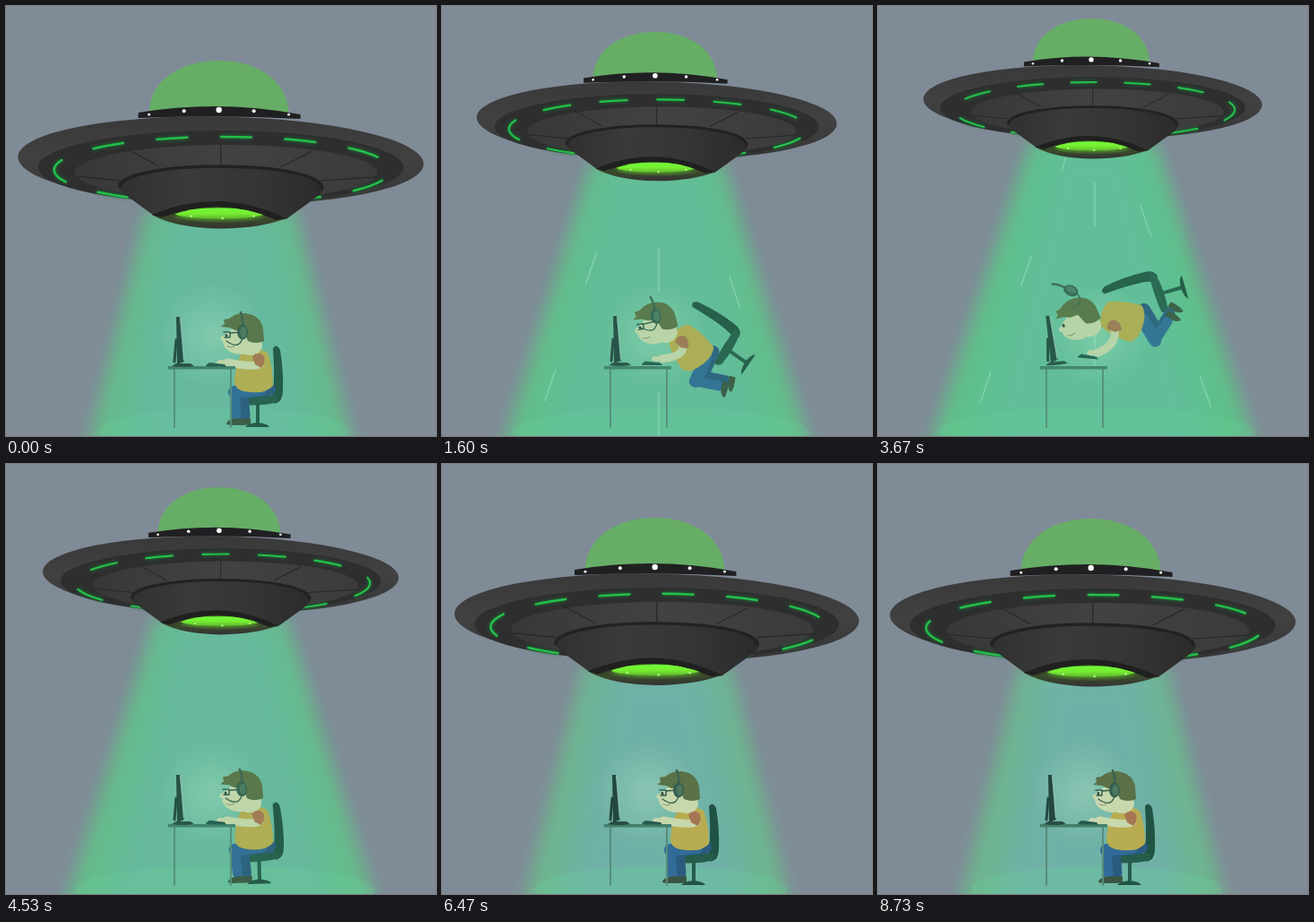
An HTML page with a canvas for the animation above (8790 ms loop, 480x480 px).

```html
<!DOCTYPE html>
<html lang="en">
<head>
<meta charset="utf-8">
<title>Abduction</title>
<style>
  html, body { margin: 0; height: 100%; overflow: hidden; background: #808b98; }
  canvas { display: block; width: 100vw; height: 100vh; }
</style>
</head>
<body>
<canvas id="stage"></canvas>
<script>
const LOOP = 8790, SIZE = 480, ARRIVE = 2450, LEAVE = 3670;
const canvas = document.getElementById('stage');
const ctx = canvas.getContext('2d');
const ratio = window.devicePixelRatio || 1;
canvas.width = canvas.height = SIZE * ratio;

const mix = (a, b, u) => a + (b - a) * u;
const progress = (t, from, to) => Math.max(0, Math.min(1, (t - from) / (to - from)));
const smooth = u => u * u * (3 - 2 * u);
const ramp = (t, from, to) => smooth(progress(t, from, to));

// lift: ship height, green: beam colour, float: weightlessness, drift: slow hover.
function stateAt(t) {
  const down = progress(t, LEAVE, LEAVE + 2900);
  const rising = t < LEAVE;
  const lift = rising ? progress(t, 0, ARRIVE) ** .9 : 1 - (down + smooth(down)) / 2;
  const fall = ramp(t, LEAVE, 4600);
  return {
    lift,
    green: rising ? .45 + .4 * lift : .85 * lift * lift,
    float: ramp(t, 700, ARRIVE) - fall,
    drift: ramp(t, ARRIVE, LEAVE) * (1 - fall)
  };
}

function fill(style, d) {
  ctx.fillStyle = style;
  ctx.fill(new Path2D(d));
}
function stroke(style, width, d) {
  ctx.strokeStyle = style;
  ctx.lineWidth = width;
  ctx.stroke(new Path2D(d));
}
function oval(style, x, y, rx, ry = rx, tilt = 0) {
  ctx.fillStyle = style;
  ctx.beginPath();
  ctx.ellipse(x, y, rx, ry, tilt, 0, 7);
  ctx.fill();
}
function at(x, y, deg, draw) {
  ctx.save();
  ctx.translate(x, y);
  ctx.rotate(deg * Math.PI / 180);
  draw();
  ctx.restore();
}
function turn(x, y, deg) {
  const a = deg * Math.PI / 180, c = Math.cos(a), s = Math.sin(a);
  return [x * c - y * s, x * s + y * c];
}
const blend = (a, b, u) => `rgb(${a.map((v, i) => Math.round(mix(v, b[i], u)))})`;
function gradient(x0, y0, x1, y1, ...colors) {
  const g = ctx.createLinearGradient(x0, y0, x1, y1);
  colors.forEach((c, i) => g.addColorStop(i / (colors.length - 1), c));
  return g;
}

function beam(ship, style, inset, blur) {
  const { x, scale } = ship, top = ship.y + 55 * scale, low = 530;
  const half = 84 * scale, base = 150 + 34 * ship.lift;
  const wide = half + (base - half) * (low - top) / (SIZE - top);
  ctx.save();
  ctx.filter = `blur(${blur * ratio}px)`;
  fill(style, `M${x - half * inset} ${top}H${x + half * inset}L${x + wide * inset} ${low}H${x - wide * inset}Z`);
  ctx.restore();
}

function drawBeam(ship, green) {
  beam(ship, blend([110, 182, 142], [96, 194, 136], green), .97, 10);
  beam(ship, blend([113, 176, 168], [100, 193, 156], green), .72, 16);
  oval('rgba(105,215,155,.2)', 244, 475, 141 + 36 * ship.lift, 26);
}

// Three rays fan out from the ship; their streaks climb, faster on the left.
function drawStreaks(t, ship) {
  const alpha = .5 * progress(t, 900, 1400) * (1 - progress(t, 4000, 4350));
  if (!alpha) return;
  const top = ship.y + 70 * ship.scale;
  ctx.lineCap = 'round';
  for (const side of [-1, 0, 1]) {
    const outer = Math.abs(side), gap = 160 + 30 * side, half = 24 - 7 * outer;
    const climb = (.19 - .06 * side) * (t - 2470);
    const rayX = y => 242 + side * (43 + .35 * (y - 200));
    for (let y = (290 - 84 * outer - climb) % gap; y < 540; y += gap) {
      const y0 = Math.max(y - half, top), y1 = y + half;
      if (y1 > y0) stroke(`rgba(175,235,215,${alpha})`, 1.6, `M${rayX(y0)} ${y0}L${rayX(y1)} ${y1}`);
    }
  }
}

function drawDesk({ float, drift }) {
  stroke('#57887a', 2, 'M188 404V470M251 404V470');
  fill('#427b6a', 'M181 402H256V405.5H181Z');
  at(197 + 2 * float, 401 - 2 * float, -5 * drift, () => {
    fill('#24443f', 'M-12 1L-7 -2L9 -2L13 1Q0 3 -12 1Z');
    fill('#203f3c', 'M-7 -54L-3 -54L2 -4L-6 -1Z');
    fill('#8dbdb0', 'M-3 -54L-1 -52L2.5 -8L1 -4Z');
    stroke('#203f3c', 3, 'M-7 -28L-9 -4');
  });
  at(234, 400 - 3 * float - 6 * drift, 5 * drift, () =>
    fill('#21524a', 'M-11 1L-7 -2L10 0L12 2.5L-10 2.5Z'));
}

function drawChair({ float, drift }) {
  const x = 306 - 3 * float + 26 * Math.sin(Math.PI * float) + 2 * drift;
  at(x, 438 - 147 * float + 7 * drift, -106 * float, () => {
    fill('#1e4c40', 'M-8 -56Q-4 -62 0 -54Q4 -30 3 -8Q3 4 -6 6L-10 0Q-5 -12 -8 -56Z');
    fill('#235548', 'M-45 -1Q-25 -4 -2 -3L-2 4Q-20 9 -42 7Q-48 3 -45 -1Z');
    stroke('#235548', 4, 'M-25 6V29');
    fill('#1e4c40', 'M-39 32Q-37 28 -25 27Q-14 28 -12 32Z');
  });
}

// Each joint bends a little further than the one before it.
function drawLeg(float, x, color) {
  ctx.lineCap = ctx.lineJoin = 'round';
  at(8 + x, 20, -40 * float, () => {
    stroke(color, 14, 'M0 0L-29 3');
    at(-29, 3, -28 * float, () => {
      stroke(color, 11, 'M0 0L2 26');
      fill('#3a4d3d', 'M8 29L8 36Q-2 38 -9 36Q-9 32 -2 30Z');
    });
  });
}

function drawHead({ float, drift }, glasses) {
  const skin = '#d0d9b0';
  oval(skin, -3, 7, 20, 15);
  oval(skin, 8, 12, 13, 11);
  oval(skin, -22, 4, 3.5, 3);
  fill('#5c6c43', 'M-25 -9L-21 -12L-22 -17L-16 -18Q-8 -25 2 -24Q19 -22 22 -7L23 7Q14 11 5 7L0 -5L-9 -5L-15 -8Z');
  stroke('#8d9478', 1, 'M-18 13Q-14 15 -10 13');
  oval('#263d35', -19, 1, 1.4, 1.9);
  ctx.globalAlpha = glasses;
  stroke('#2d554b', 1.5, 'M-22 -3H-15V3H-21M-15 -2L-2 -3');
  ctx.globalAlpha = 1;
  at(-1 + 3 * float, -3 - 10 * float - 20 * drift, -45 * drift, () => {
    stroke('#3a5c4b', 2.5, 'M0 -4Q1 -15 -2 -22');
    stroke('#3a5c4b', 1.3, 'M0 7Q-4 20 -18 10');
    oval('#34594b', 0, 0, 6, 8.5);
    oval('#4c7360', 1, 0, 3.5, 6);
  });
}

function drawMan(state, glasses) {
  const { float, drift } = state;
  const x = 276 - 3 * drift, y = 408 - 50 * float - 7 * drift, lean = -75 * float;
  at(x, y, lean, () => {
    drawLeg(float, 10, '#28547f');
    drawLeg(float, 0, '#2f6599');
    fill('#bfab4d', 'M-12 -22Q4 -28 16 -21Q22 -6 22 16Q14 25 -4 23Q-20 22 -21 12Q-20 -10 -12 -22Z');
    at(-11, -41 - 6 * float, 55 * float, () => drawHead(state, glasses));
  });

  const [sx, sy] = turn(7 - 15 * float, -13 + 6 * float, lean);
  const shoulder = [x + sx, y + sy], hand = [240 - 2 * float, 398 - 8 * float - 3 * drift];
  const elbow = shoulder.map((v, i) => (v + hand[i]) / 2 + 15 - 8 * i);
  ctx.lineCap = 'round';
  stroke('#d0d9b0', 9, `M${shoulder[0]} ${shoulder[1] + 5}Q${elbow} ${hand[0] + 7} ${hand[1]}`);
  oval('#d0d9b0', ...hand, 5, 3);
  at(...shoulder, -50 * float, () => fill('#ac704f', 'M-8 -4Q-1 -11 5 -4Q7 3 2 9L-5 5Z'));
}

function drawGlow(float) {
  const x = 230 + 16 * float, y = 368;
  const glow = ctx.createRadialGradient(x, y, 5, x, y, 58);
  glow.addColorStop(0, 'rgba(175,225,200,.42)');
  glow.addColorStop(1, 'rgba(175,225,200,0)');
  oval(glow, x, y, 58);
}

// Eleven dashes make one full turn of the rim per loop.
function drawLights(t) {
  const rx = 188, ry = 37, h = ((rx - ry) / (rx + ry)) ** 2;
  const around = Math.PI * (rx + ry) * (1 + 3 * h / (10 + Math.sqrt(4 - 3 * h)));
  ctx.save();
  ctx.lineCap = 'round';
  ctx.strokeStyle = '#24c04b';
  ctx.lineWidth = 2.5;
  ctx.shadowColor = '#168a35';
  ctx.shadowBlur = 4 * ratio;
  ctx.setLineDash([34, around / 11 - 34]);
  ctx.lineDashOffset = 2 - around * t / LOOP;
  ctx.beginPath();
  ctx.ellipse(242, 183, rx, ry, 0, -Math.PI / 2, Math.PI * 1.5);
  ctx.stroke();
  ctx.restore();
}

function drawMouth() {
  fill(gradient(0, 228, 0, 248, '#2c3a20', '#3b4a2c', '#333433'),
    'M163 233Q238 201 313 237Q285 248 240 248.5Q190 248 163 233Z');
  fill('#1f201f', 'M163 233Q238 201 313 237L302 239Q238 211 174 236Z');
  ctx.save();
  ctx.clip(new Path2D('M180 235Q238 213 298 237Q270 242 240 242Q204 242 180 235Z'));
  ctx.shadowColor = '#63d92f';
  ctx.shadowBlur = 6 * ratio;
  oval(gradient(0, 225, 0, 238, '#70fa38', '#76ee32', '#5fb52c'), 239, 231.5, 50, 6);
  ctx.restore();
  for (const k of [-1, 0, 1]) oval('#b4ff83', 242 + 35 * k, 237 - 2.5 * Math.abs(k), 1.3);
}

function drawShip(ship, t) {
  ctx.save();
  ctx.translate(ship.x, ship.y);
  ctx.scale(ship.scale, ship.scale);
  ctx.translate(-240, -170);
  ctx.lineCap = 'butt';

  fill('#66ae66', 'M160 118C161 84 194 61 238 61C283 61 315 85 316 120Z');
  oval(gradient(0, 122, 0, 222, '#393939', '#414141', '#353535'), 240, 172.5, 226.5, 49, .018);
  fill('#202022', 'M148 119Q238 104 329 121V126Q238 121 148 125Z');
  for (let k = -2; k <= 2; k++)
    oval('#fff', 238 + 39 * k, 116 + 1.3 * k * k, 3.2 / (1 + .6 * Math.abs(k)));
  oval('#2e2e2f', 240, 180, 204, 41);
  oval(gradient(78, 0, 415, 0, '#383838', '#424242', '#3b3b3b'), 246, 186, 169, 31);
  stroke('#272727', 1.2, 'M136 160L171 179M240 155V178M342 162L307 180M78 190L128 195M414 191L352 195');
  drawLights(t);

  fill(gradient(125, 0, 355, 0, '#303030', '#3a3a3a', '#353535', '#2b2b2b'),
    'M125 200C127 170 353 170 355 202Q354 209 346 214L313 238L240 246L164 233L134 211Q126 205 125 200Z');
  stroke('#222223', 3.5, 'M127 203C127 171 353 171 353 204');
  drawMouth();
  ctx.restore();
}

function render(t) {
  const state = stateAt(t), { lift, green, float } = state;
  const ship = { x: 239.7, y: 170 - 65 * lift, scale: 1 - .165 * lift, lift };
  const glasses = 1 - progress(t, 1900, 2250) + progress(t, 3950, 4300);

  ctx.setTransform(ratio, 0, 0, ratio, 0, 0);
  ctx.fillStyle = '#808b98';
  ctx.fillRect(0, 0, SIZE, SIZE);
  drawBeam(ship, green);
  drawStreaks(t, ship);
  drawGlow(float);
  drawChair(state);
  drawMan(state, glasses);
  drawDesk(state);

  ctx.globalAlpha = .06 + .16 * green;
  beam(ship, '#50c084', .88, 12);
  ctx.globalAlpha = 1;
  drawShip(ship, t);
}

const begin = performance.now();
function frame() {
  render((performance.now() - begin) % LOOP);
  requestAnimationFrame(frame);
}
frame();
</script>
</body>
</html>
```
